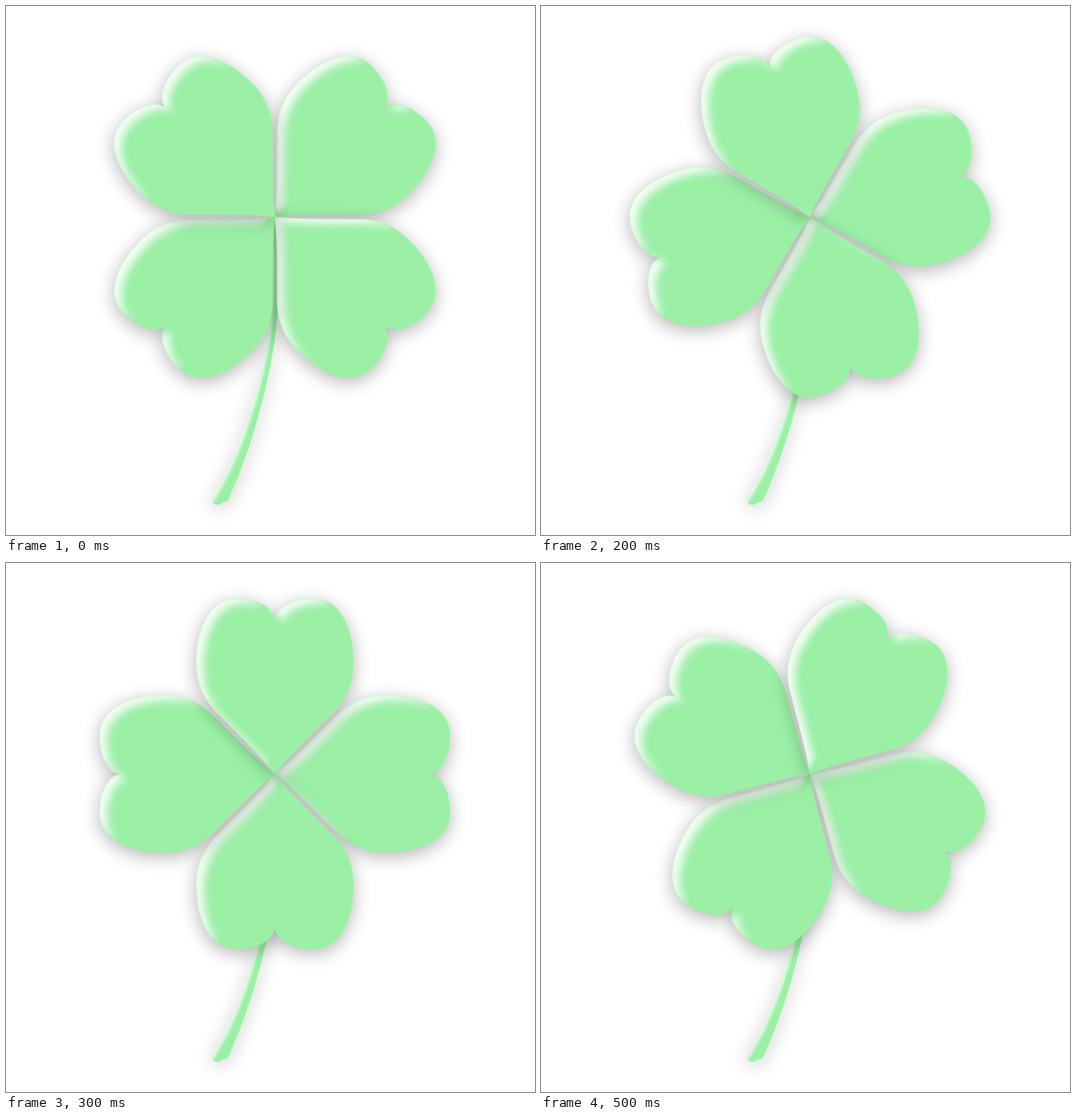
An HTML page for the animation above (0.6 s loop, 640 by 640 pixels).

```html
<!DOCTYPE html>
<html lang="en">
<head>
<meta charset="utf-8">
<title>Spinning clover</title>
<style>
  html, body { margin: 0; width: 100%; height: 100%; overflow: hidden; background: #fff; }
  svg { display: block; width: 100%; height: 100%; }
  .leaf, .stem { fill: #9bf0a6; }
  .leaf { animation: turn 600ms steps(6, end) infinite; }
  @keyframes turn {
    from { transform: rotate(0deg); }
    to { transform: rotate(90deg); }
  }
</style>
</head>
<body>
<svg viewBox="0 0 640 640">
  <defs>
    <!-- Fixed light from the upper left, applied outside the rotation -->
    <filter id="relief" filterUnits="userSpaceOnUse" x="0" y="0" width="640" height="640" color-interpolation-filters="sRGB">
      <feGaussianBlur in="SourceAlpha" stdDeviation="11" result="halo"/>
      <feOffset in="halo" dy="5" result="low"/>
      <feComponentTransfer in="low" result="shadow">
        <feFuncA type="linear" slope="0.3"/>
      </feComponentTransfer>
      <feGaussianBlur in="SourceAlpha" stdDeviation="4.6" result="soft"/>
      <feOffset in="soft" dx="-8.6" dy="-6.2" result="lit"/>
      <feOffset in="soft" dx="8.6" dy="6.2" result="unlit"/>
      <feComposite in="lit" in2="unlit" operator="arithmetic" k2="1" k3="-1" result="edge"/>
      <feColorMatrix in="edge" values="0 0 0 0 1  0 0 0 0 1  0 0 0 0 1  0 0 0 0.85 0" result="glow"/>
      <feComposite in="glow" in2="SourceAlpha" operator="in" result="shine"/>
      <feMerge>
        <feMergeNode in="shadow"/>
        <feMergeNode in="SourceGraphic"/>
        <feMergeNode in="shine"/>
      </feMerge>
    </filter>
    <filter id="thin" filterUnits="userSpaceOnUse" x="0" y="0" width="640" height="640" color-interpolation-filters="sRGB">
      <feGaussianBlur in="SourceAlpha" stdDeviation="11" result="halo"/>
      <feOffset in="halo" dy="5" result="low"/>
      <feComponentTransfer in="low" result="shadow">
        <feFuncA type="linear" slope="0.2"/>
      </feComponentTransfer>
      <feGaussianBlur in="SourceAlpha" stdDeviation="2" result="soft"/>
      <feOffset in="soft" dx="-2.5" dy="-1.7" result="lit"/>
      <feOffset in="soft" dx="2.5" dy="1.7" result="unlit"/>
      <feComposite in="lit" in2="unlit" operator="arithmetic" k2="1" k3="-1" result="edge"/>
      <feColorMatrix in="edge" values="0 0 0 0 1  0 0 0 0 1  0 0 0 0 1  0 0 0 0.85 0" result="glow"/>
      <feComposite in="glow" in2="SourceAlpha" operator="in" result="shine"/>
      <feMerge>
        <feMergeNode in="shadow"/>
        <feMergeNode in="SourceGraphic"/>
        <feMergeNode in="shine"/>
      </feMerge>
    </filter>
  </defs>
  <g filter="url(#thin)">
    <path class="stem" d="M324 254C330 290 331 350 327 390C320 450 298 535 269 597Q267 601 263 600Q257 606 251 602Q247 597 252 590C278 550 305 470 317 400C322 360 323 300 322 258Z"/>
  </g>
  <g id="leaves"></g>
</svg>
<script>
  const heart = "M0 0C-20 -25 -50 -53 -72 -76C-90 -95 -95 -115 -95 -135" +
    "C-95 -175 -80 -212 -47 -212C-22 -212 -3 -203 0 -187" +
    "C3 -203 22 -212 47 -212C80 -212 95 -175 95 -135" +
    "C95 -115 90 -95 72 -76C50 -53 20 -25 0 0Z";

  // Painted clockwise, so the upper left leaf lies on top
  const angles = [45, 135, 225, 315];

  document.getElementById("leaves").innerHTML = angles.map(a =>
    `<g filter="url(#relief)"><g transform="translate(325.2 255.2) rotate(${a})">` +
    `<path class="leaf" d="${heart}"/></g></g>`).join("");
</script>
</body>
</html>
```
